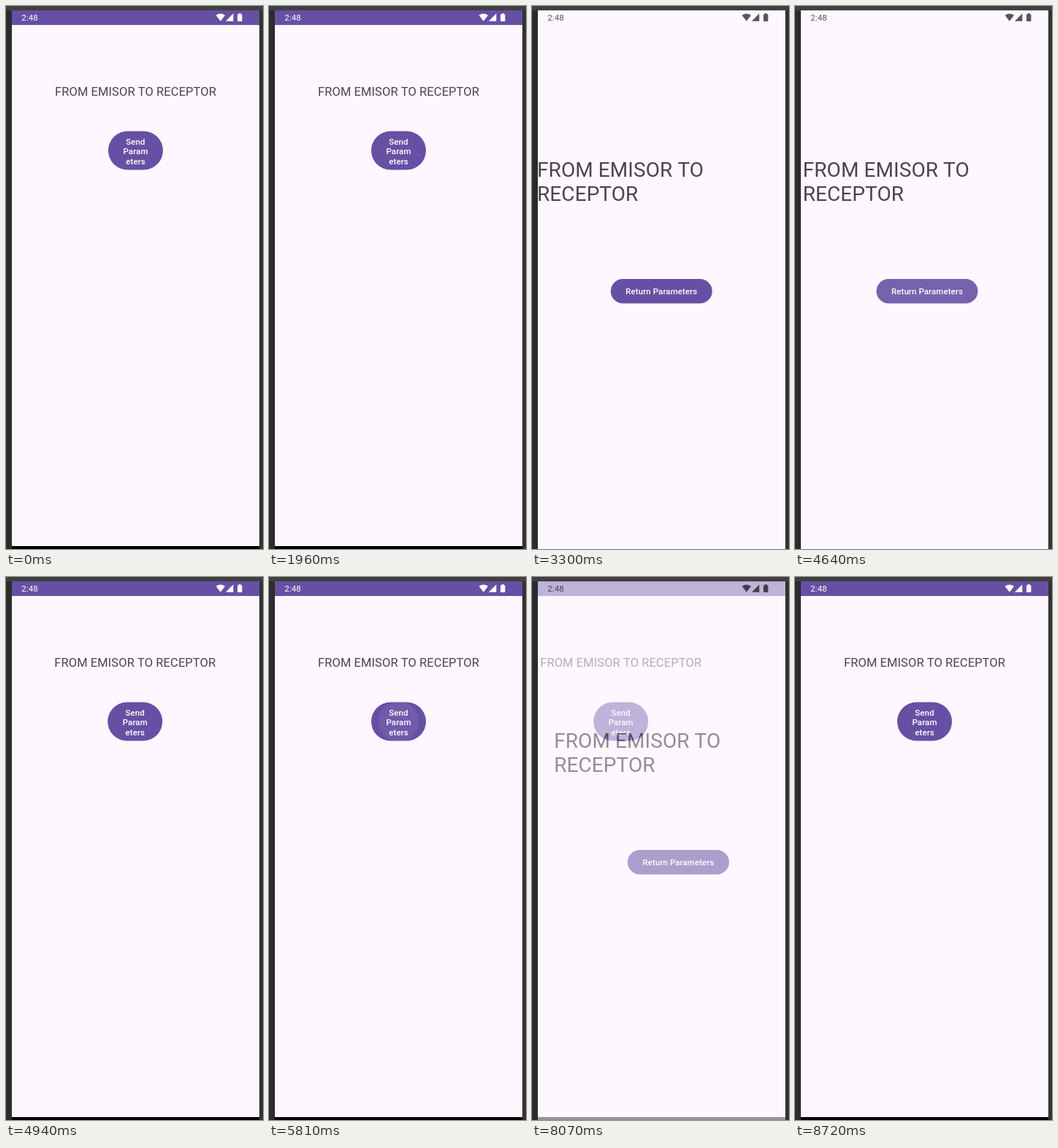
These frames come from a looping animation (352 px wide and 744 px high, 9410 ms). An HTML page with a canvas:

```html
<!DOCTYPE html>
<html lang="en">
<head>
<meta charset="utf-8">
<title>Passing parameters between screens</title>
<style>
  html, body { margin: 0; width: 100%; height: 100%; overflow: hidden; background: #2c2c2c; }
  canvas { display: block; }
</style>
</head>
<body>
<canvas id="stage" width="352" height="744"></canvas>
<script>
const W = 352, H = 744, LOOP = 9410;
const SCREEN = { x: 8, y: 6, w: 339, h: 738 };
const SLIDE = 79, SLIDE_MS = 450;
const PAPER = '#fef7ff', PURPLE = '#6750a4', INK = '#49454f';

// Each visit: press "Send", second screen opens, press "Return", it closes.
const VISITS = [
  { send: 1955, open: 2636, back: 4235, close: 4608 },
  { send: 5765, open: 6260, back: 7645, close: 8002 }
];

const ctx = document.getElementById('stage').getContext('2d');
const layer = document.createElement('canvas');
layer.width = W;
layer.height = H;
const layerCtx = layer.getContext('2d');

const clamp = v => Math.min(1, Math.max(0, v));
const ramp = (t, start, length) => clamp((t - start) / length);

function cubic(a, b, c, d, s) {
  const r = 1 - s;
  return a * r * r * r + 3 * b * r * r * s + 3 * c * r * s * s + d * s * s * s;
}

// Two joined Bezier segments: quick start, very slow arrival.
function ease(t) {
  const [xs, ys] = t < 1 / 6
    ? [[0, 0.05, 0.133333, 1 / 6], [0, 0, 0.06, 0.4]]
    : [[1 / 6, 0.208333, 0.25, 1], [0.4, 0.82, 1, 1]];
  let lo = 0, hi = 1;
  for (let i = 0; i < 24; i++) {
    const mid = (lo + hi) / 2;
    if (cubic(...xs, mid) < t) lo = mid; else hi = mid;
  }
  return cubic(...ys, lo);
}

function rect(c, color, x, y, w, h) {
  c.fillStyle = color;
  c.fillRect(x, y, w, h);
}

function text(c, str, x, y, size, color, weight = 400, align = 'left') {
  c.font = `${weight} ${size}px Roboto, sans-serif`;
  c.letterSpacing = '0.08px';
  c.textAlign = align;
  c.fillStyle = color;
  c.fillText(str, x, y);
}

function button(c, x, y, w, h, lines, baseline, held) {
  c.save();
  c.beginPath();
  c.roundRect(x, y, w, h, h / 2);
  c.fillStyle = PURPLE;
  c.fill();
  if (held >= 0) {
    const reach = Math.hypot(w, h) / 2;
    c.clip();
    c.globalAlpha = 0.1 * ramp(held, 0, 75);
    c.beginPath();
    c.arc(x + w / 2, y + h / 2, reach * (0.5 + 0.5 * ramp(held, 0, 225)), 0, Math.PI * 2);
    c.fillStyle = '#fff';
    c.fill();
  }
  c.restore();
  lines.forEach((line, i) =>
    text(c, line, x + w / 2, baseline + i * 13.5, 11.5, '#fff', 500, 'center'));
}

function sender(c, dx, held) {
  rect(c, PAPER, SCREEN.x, SCREEN.y, SCREEN.w, SCREEN.h);
  rect(c, PURPLE, SCREEN.x, SCREEN.y, SCREEN.w, 20);
  rect(c, '#000', SCREEN.x, 740, SCREEN.w, 4);
  text(c, 'FROM EMISOR TO RECEPTOR', 177.5 + dx, 123, 16.5, INK, 400, 'center');
  button(c, 140 + dx, 171.5, 75, 53, ['Send', 'Param', 'eters'], 189.5, held);
}

function receiver(c, dx, held) {
  rect(c, PAPER, SCREEN.x, SCREEN.y, SCREEN.w, SCREEN.h);
  text(c, 'FROM EMISOR TO', 7 + dx, 234, 28, INK);
  text(c, 'RECEPTOR', 7 + dx, 267, 28, INK);
  button(c, 107.8 + dx, 374, 139, 33.5, ['Return Parameters'], 395, held);
}

function statusIcons(dark) {
  const shade = Math.round(255 * (1 - dark));
  const color = `rgba(${shade},${shade},${shade},${1 - 0.35 * dark})`;
  text(ctx, '2:48', 21.3, 20, 11.5, color);
  ctx.fillStyle = color;
  ctx.beginPath();
  ctx.moveTo(293.8, 20.8);
  ctx.lineTo(287.6, 12.8);
  ctx.quadraticCurveTo(293.8, 8.2, 300, 12.8);
  ctx.closePath();
  ctx.moveTo(301, 20.8);
  ctx.lineTo(311.3, 20.8);
  ctx.lineTo(311.3, 10.3);
  ctx.closePath();
  ctx.roundRect(317, 11.2, 6.4, 9.8, 1);
  ctx.rect(318.7, 10, 3, 1.4);
  ctx.fill();
}

function bezel() {
  rect(ctx, '#2c2c2c', 0, 0, 8, H);
  rect(ctx, '#333', 347, 0, 5, H);
  rect(ctx, '#404040', 0, 0, W, 6);
}

function draw(t) {
  const visit = VISITS.find(v => t < v.close + SLIDE_MS);
  const opening = visit ? t - visit.open : -1;
  const closing = visit ? t - visit.close : -1;
  let senderX = 0, receiverX = 0, alpha = 0, dark = 0;

  if (closing >= 0) {
    const p = ease(clamp(closing / SLIDE_MS));
    senderX = -SLIDE * (1 - p);
    receiverX = SLIDE * p;
    alpha = 1 - ramp(closing, 35, 83);
    dark = 1 - ramp(closing, 100, 120);
  } else if (opening >= 0) {
    const p = ease(clamp(opening / SLIDE_MS));
    senderX = -SLIDE * p;
    receiverX = SLIDE * (1 - p);
    alpha = ramp(opening, 50, 83);
    dark = ramp(opening, 20, 120);
  }

  bezel();
  ctx.save();
  ctx.beginPath();
  ctx.rect(SCREEN.x, SCREEN.y, SCREEN.w, SCREEN.h);
  ctx.clip();
  sender(ctx, senderX, visit && closing < 0 ? t - visit.send : -1);
  if (alpha > 0) {
    layerCtx.clearRect(0, 0, W, H);
    receiver(layerCtx, receiverX, t - visit.back);
    ctx.globalAlpha = alpha;
    ctx.drawImage(layer, 0, 0);
    ctx.globalAlpha = 1;
  }
  statusIcons(dark);
  ctx.restore();
}

const begin = performance.now();
function tick() {
  draw((performance.now() - begin) % LOOP);
  requestAnimationFrame(tick);
}
tick();
</script>
</body>
</html>
```
